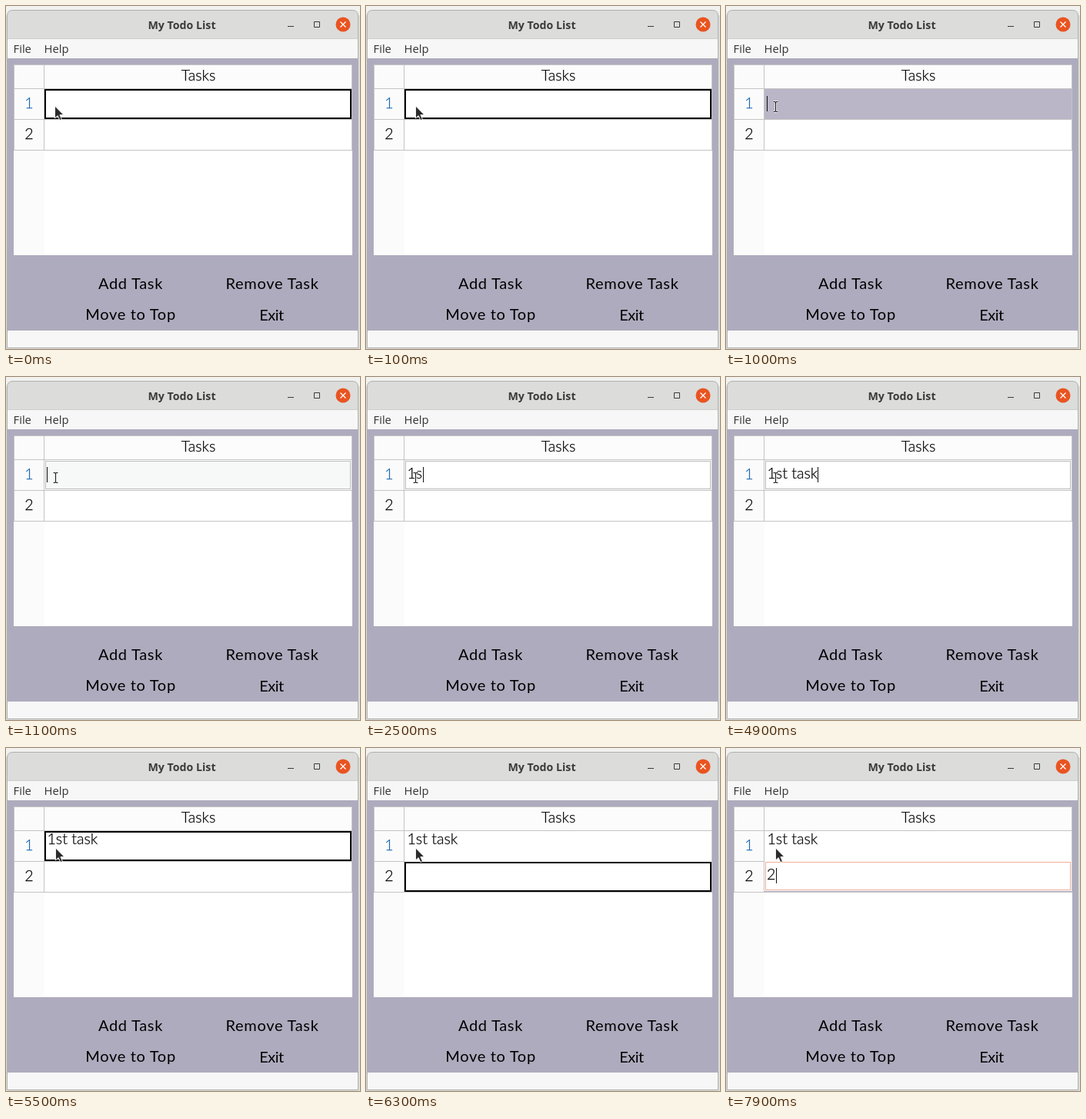
Animation of 460 by 446 pixels, one loop 8000 ms. Source, as an HTML page:

```html
<!DOCTYPE html>
<html lang="en">
<head>
<meta charset="utf-8">
<title>My Todo List</title>
<style>
  html, body { margin: 0; width: 100%; height: 100%; overflow: hidden; background: #dcdcdb; }
  svg { display: block; width: 460px; height: 446px; }
  text { white-space: pre; }
  .title { font: 700 14.2px "Open Sans", "Noto Sans", sans-serif; fill: #3b3b3b; text-anchor: middle; }
  .menu { font: 14.8px "Open Sans", "Noto Sans", sans-serif; fill: #333; }
  .table { font: 300 19.6px Lato, sans-serif; fill: #000; stroke: #000; stroke-width: .25px; }
  .button { font: 400 20px Lato, sans-serif; fill: #000; letter-spacing: .7px; text-anchor: middle; }
  .mid { text-anchor: middle; }
  .grid { fill: #c4c4c4; shape-rendering: crispEdges; }
</style>
</head>
<body>
<svg viewBox="0 0 460 446">
  <rect width="460" height="12" fill="#f1f1f0"/>
  <path d="M1.5 444.5V13q0-7.5 7.5-7.5h441q7.5 0 7.5 7.5v431.5z" fill="#dcdcdb" stroke="#b0b0ae"/>
  <rect x="2" y="42" width="455" height="1" fill="#cfcfcd"/>
  <rect x="2" y="43" width="455" height="25" fill="#f7f7f7"/>
  <rect x="2" y="68" width="455" height="354" fill="#afabbe"/>
  <rect x="2" y="422" width="455" height="22" fill="#f7f7f7"/>

  <text class="title" x="228.5" y="30">My Todo List</text>
  <path d="M366 26.5h8M400.5 20.5h7v7h-7z" fill="none" stroke="#3b3b3b"/>
  <circle cx="438" cy="24" r="9.5" fill="#e95420"/>
  <path d="M434.5 20.5l7 7m0-7l-7 7" stroke="#fff" stroke-width="1.3"/>
  <text class="menu" x="9.5" y="61">File</text>
  <text class="menu" x="49.5" y="61">Help</text>

  <rect x="10" y="76" width="440" height="248" fill="#fff"/>
  <rect x="10" y="76" width="40" height="248" fill="#fbfbfb"/>
  <rect x="50" y="77" width="399" height="30" fill="#fcfcfc"/>
  <g class="grid">
    <rect x="10" y="76" width="440" height="1"/>
    <rect x="10" y="107" width="440" height="1"/>
    <rect x="10" y="147" width="40" height="1"/>
    <rect id="divider" x="50" y="147" width="400" height="1"/>
    <rect x="10" y="187" width="440" height="1"/>
    <rect x="10" y="76" width="1" height="112"/>
    <rect x="49" y="76" width="1" height="112"/>
    <rect x="449" y="76" width="1" height="112"/>
  </g>
  <text class="table mid" x="250" y="97">Tasks</text>
  <text class="table mid" x="30" y="133" style="fill:#1763ad;stroke:#1763ad">1</text>
  <text class="table mid" x="30" y="173">2</text>

  <rect id="underline" x="50" y="186" width="399" height="1" fill="#afabbe"/>
  <rect id="cell" shape-rendering="crispEdges"/>
  <text id="first" class="table" x="53.5"></text>
  <text id="second" class="table" x="53" y="171"></text>
  <rect id="caret" width="1" height="20" fill="#111" shape-rendering="crispEdges"/>

  <path id="arrow" d="M0 0v16l3.7-3.4 2.6 6 2.7-1.2-2.6-5.8h5z" fill="#2b2b2b" stroke="#fff" stroke-width=".9"/>
  <g id="beam" fill="none">
    <path d="M61.5 124.5h2l1 1 1-1h2M64.5 125v12M61.5 137.5h2l1-1 1 1h2" stroke="#fff" stroke-width="2.6"/>
    <path d="M61.5 124.5h2l1 1 1-1h2M64.5 125v12M61.5 137.5h2l1-1 1 1h2" stroke="#222" stroke-width="1.2"/>
  </g>

  <text class="button" x="162" y="368">Add Task</text>
  <text class="button" x="346" y="368">Remove Task</text>
  <text class="button" x="162" y="408">Move to Top</text>
  <text class="button" x="345" y="409" style="letter-spacing:-.5px">Exit</text>
</svg>
<script>
  const LOOP = 8000;
  const $ = id => document.getElementById(id);

  // Cell looks: inset from the row's top-left corner, fill and border.
  const LOOKS = {
    focus:  { x: 51, dy: 2, w: 397, h: 37, fill: '#fff', stroke: '#000', line: 2 },
    picked: { x: 50, dy: 1, w: 399, h: 39, fill: '#bab6c8', stroke: 'none', line: 0 },
    fading: { x: 51.5, dy: 2.5, w: 396, h: 36, fill: '#f7f8f8', stroke: '#bdbdbd', line: 1 },
    edit:   { x: 51.5, dy: 2.5, w: 396, h: 36, fill: '#fff', stroke: '#b9b9b9', line: 1 },
    active: { x: 51.5, dy: 1.5, w: 396, h: 36, fill: '#fff', stroke: '#efad99', line: 1 }
  };

  // Each step changes only the listed properties; caret is its x, or 0 when hidden.
  const STEPS = [
    [0,    { look: 'focus', row: 0, first: '', second: '', caret: 0, pointer: 63.5 }],
    [100,  { pointer: 64.5 }],
    [1000, { look: 'picked', caret: 53, pointer: 0 }],
    [1100, { look: 'fading' }],
    [1200, { look: 'edit' }],
    [1800, { first: '1', caret: 64 }],
    [2100, { caret: 0 }],
    [2200, { caret: 64 }],
    [2500, { first: '1s', caret: 74 }],
    [3000, { first: '1st', caret: 79 }],
    [3400, { caret: 0 }],
    [3700, { first: '1st ', caret: 86 }],
    [4200, { caret: 0 }],
    [4400, { caret: 86 }],
    [4500, { first: '1st t', caret: 91 }],
    [4600, { first: '1st ta', caret: 101 }],
    [4700, { first: '1st tas', caret: 110 }],
    [4900, { first: '1st task', caret: 119 }],
    [5400, { look: 'focus', caret: 0 }],
    [5500, { pointer: 64.5 }],
    [6300, { row: 1 }],
    [7800, { look: 'picked', second: '2', caret: 65 }],
    [7900, { look: 'active' }]
  ];

  const show = (node, visible) => node.setAttribute('visibility', visible ? 'visible' : 'hidden');
  const set = (node, attrs) => {
    for (const name in attrs) node.setAttribute(name, attrs[name]);
  };

  function render(time) {
    const state = {};
    for (const [at, change] of STEPS) if (at <= time) Object.assign(state, change);

    const look = LOOKS[state.look];
    set($('cell'), {
      x: look.x, y: 107 + 40 * state.row + look.dy, width: look.w, height: look.h,
      fill: look.fill, stroke: look.stroke, 'stroke-width': look.line
    });
    show($('divider'), state.row === 0);
    show($('underline'), state.look === 'active');

    const editingFirst = state.look !== 'focus' && state.row === 0;
    $('first').textContent = state.first;
    $('first').setAttribute('y', editingFirst ? 132 : 125);
    $('second').textContent = state.second;

    show($('caret'), state.caret);
    set($('caret'), { x: state.caret, y: state.row ? 156 : 117 });

    show($('arrow'), state.pointer);
    show($('beam'), !state.pointer);
    $('arrow').setAttribute('transform', `translate(${state.pointer} 130)`);
  }

  const start = performance.now();
  function tick() {
    render((performance.now() - start) % LOOP);
    requestAnimationFrame(tick);
  }
  tick();
</script>
</body>
</html>
```
